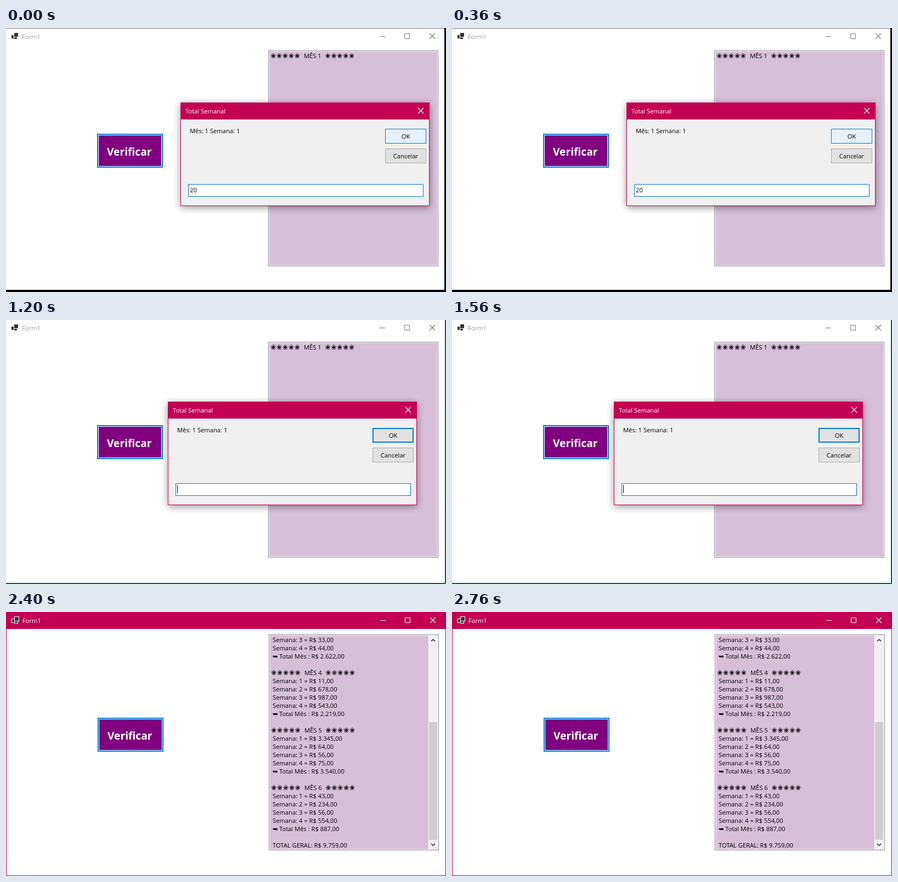
Recreate the animation shown at these times as an HTML page. Size 802 by 482 pixels, loop 3000 ms.

```html
<!DOCTYPE html>
<html lang="pt-BR">
<head>
<meta charset="utf-8">
<title>Form1</title>
<style>
  html, body { margin: 0; width: 100%; height: 100%; overflow: hidden; background: #fff; }
  svg { display: block; position: absolute; left: 0; top: 0; }
  text { font: 11.2px "Open Sans", "Noto Sans", sans-serif; white-space: pre; }
  .big { font-size: 19.2px; font-weight: 700; }
  .sym { font: 12px "DejaVu Sans", sans-serif; }
  .mid { text-anchor: middle; }
</style>
</head>
<body>
<svg id="stage" width="802" height="482" viewBox="0 0 802 482">
  <defs>
    <filter id="blur" x="-20%" y="-30%" width="140%" height="160%">
      <feGaussianBlur stdDeviation="7"/>
    </filter>
  </defs>
</svg>
<script>
const STEP = 600, LOOP = 3000;
const ACCENT = '#c30052', BLUE = '#0078d7', FACE = '#f0f0f0';

const months = [
  [20, 30, 45, 54], [67, 78, 97, 100], [200, 2345, 33, 44],
  [11, 678, 987, 543], [3345, 64, 56, 75], [43, 234, 56, 554]
];

const sum = list => list.reduce((a, b) => a + b, 0);
const money = n => `R$ ${String(n).replace(/\B(?=(\d{3})+$)/g, '.')},00`;

const rect = (x, y, w, h, fill) =>
  `<rect x="${x}" y="${y}" width="${w}" height="${h}" fill="${fill}"/>`;
const box = (x, y, w, h, edge, fill, b = 1) =>
  rect(x, y, w, h, edge) + rect(x + b, y + b, w - 2 * b, h - 2 * b, fill);
const text = (x, y, str, fill = '#000', cls = '') =>
  `<text x="${x}" y="${y}" fill="${fill}" class="${cls}">${str}</text>`;
const line = (d, color, width = 1) =>
  `<path d="${d}" fill="none" stroke="${color}" stroke-width="${width}"/>`;
const cross = (x, y, color) =>
  line(`M${x} ${y}l10 10m0 -10l-10 10`, color, 1.1);
const shift = (x, y, body) => `<g transform="translate(${x} ${y})">${body}</g>`;

// Report lines, each a function of its baseline
const heading = n => y => {
  const flowers = x => text([0, 1, 2, 3, 4].map(i => x + i * 10.9).join(' '), y, '❀❀❀❀❀', '#000', 'sym mid');
  return flowers(488.5) + text(544, y, `MÊS ${n}`) + flowers(587.8);
};
const plain = str => y => text(486, y, str);
const total = n => y => text(486, y, '➥', '#000', 'sym') + text(498, y, `Total Mês : ${money(n)}`);

const report = months.flatMap((weeks, m) => [
  heading(m + 1),
  ...weeks.map((v, w) => plain(`Semana: ${w + 1} = ${money(v)}`)),
  total(sum(weeks)),
  () => ''
]);
report.push(plain(`TOTAL GERAL: ${money(sum(months.flat()))}`));

const lines = (from, count) =>
  report.slice(from, from + count).map((draw, i) => draw(55 + i * 15)).join('');

const scrollbar = (y, color) =>
  rect(770, 43, 17, 390, FACE) + rect(770, 43, 1, 390, '#fff') + rect(771, y, 15, 215, color) +
  line('M775 53.5l3.5 -3.5l3.5 3.5M775 423l3.5 3.5l3.5 -3.5', '#505050', 1.8);

function form(active, content) {
  const ink = active ? '#fff' : '#777';
  return (active ? box(0, 0, 802, 482, ACCENT, '#fff') + rect(0, 0, 802, 31, ACCENT)
                 : rect(0, 0, 803, 483, '#fff')) +
    rect(10, 12, 7, 8, '#fff') + rect(15, 16, 7, 5, '#fff') + rect(15, 8, 9, 9, '#fff') +
    rect(11, 13, 4, 6, '#333') + rect(16, 17, 5, 3, '#333') + rect(16, 9, 7, 7, '#333') +
    text(30, 20, 'Form1', active ? '#fff' : '#999') +
    line('M682 15.5h10M727.5 10.5h9v9h-9z', ink) + cross(773, 10, ink) +
    box(167, 193, 120, 62, BLUE, '#fff', 2) + rect(170, 196, 114, 56, '#800080') +
    text(185, 233, 'Verificar', '#fff', 'big') +
    box(479, 41, 310, 394, '#828790', '#fff') + rect(481, 43, 306, 390, '#d8bfd8') +
    content;
}

const button = (y, label, edge, fill, b) =>
  box(373, y, 75, 27, edge, fill, b) + text(410.5, y + 18, label, '#000', 'mid');

const dialog = (x, y, okButton, entry) => shift(x, y,
  `<g filter="url(#blur)" opacity=".42">${rect(0, 3, 454, 189, '#000')}</g>` +
  box(0, 0, 454, 189, ACCENT, FACE) + rect(0, 0, 454, 31, ACCENT) +
  text(9, 20, 'Total Semanal', '#fff') + cross(433, 10, '#fff') +
  text(17, 56, 'Mês: 1 Semana: 1') + okButton +
  button(84, 'Cancelar', '#adadad', '#e1e1e1') +
  box(14, 149, 429, 23, BLUE, '#fff') + entry);

const scenes = [
  shift(-1, 0, form(false, lines(0, 1))) +
    rect(0, 0, 802, 1, '#777') + rect(799, 0, 3, 482, '#000') + rect(0, 478, 802, 4, '#000') +
    dialog(318, 136, button(48, 'OK', BLUE, '#e5f1fb'), text(17, 164, '20')),
  form(true, ''),
  shift(-1, -1, form(false, lines(0, 1))) +
    line('M800.5 0V480.5H0', '#444') + line('M801.5 0V481.5H0', ACCENT) +
    dialog(295, 149, button(48, 'OK', BLUE, '#e1e1e1', 2), rect(17, 152, 1, 15, '#000')),
  form(true, lines(0, 26) + scrollbar(60, '#a6a6a6')),
  form(true, lines(17, 26) + scrollbar(201, '#cdcdcd'))
];

const stage = document.getElementById('stage');
scenes.forEach((body, i) => {
  const g = document.createElementNS('http://www.w3.org/2000/svg', 'g');
  g.innerHTML = body;
  stage.append(g);
  const share = STEP / LOOP;
  g.animate([
    { opacity: 1, offset: 0 }, { opacity: 1, offset: share },
    { opacity: 0, offset: share }, { opacity: 0, offset: 1 }
  ], { duration: LOOP, delay: i * STEP - LOOP, iterations: Infinity });
});
</script>
</body>
</html>
```
